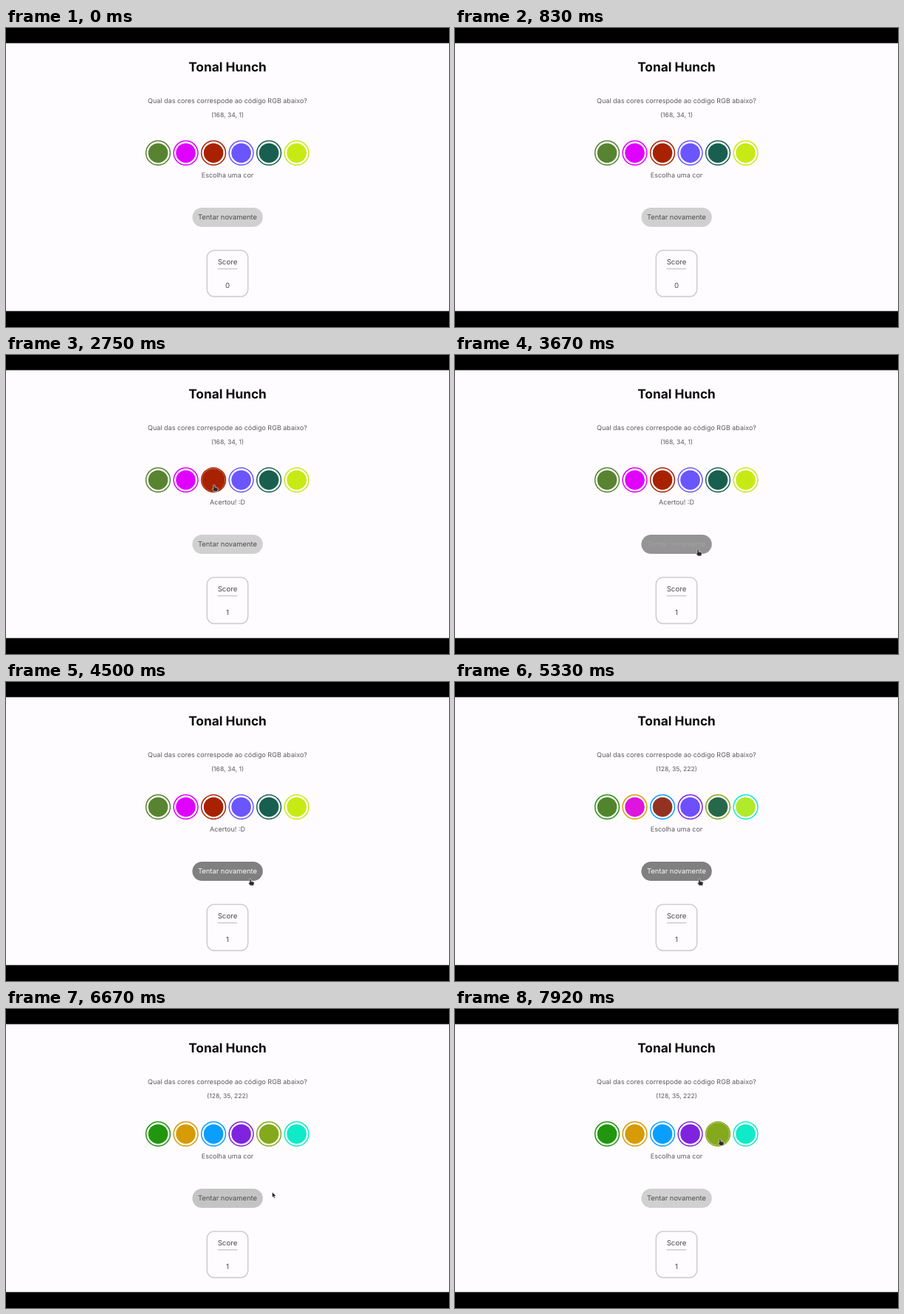
An HTML page that plays this animation: 600x406 px, repeating every 8 s.

```html
<!DOCTYPE html>
<html lang="pt">
<head>
<meta charset="utf-8">
<title>Tonal Hunch</title>
<style>
  html, body { margin: 0; width: 100%; height: 100%; overflow: hidden; background: #000; }
  svg { display: block; width: 100%; height: 100%; }
  text {
    font: 9px Inter, "Open Sans", sans-serif;
    fill: #5c5a5c;
    text-anchor: middle;
    text-rendering: geometricPrecision;
  }
  #title { font-size: 17.3px; font-weight: 700; fill: #0b0b0b; }
  #code { font-size: 8.6px; }
  #label { font-size: 9.4px; }
  .score { font-size: 9.7px; fill: #4c4a4c; }
  .line { fill: none; stroke: #d0ced0; stroke-width: 1.6; }
</style>
</head>
<body>
<svg viewBox="0 0 600 406">
  <rect width="600" height="406" fill="#000"/>
  <rect y="20.6" width="600" height="363.8" fill="#fefcfe"/>
  <text id="title" x="300" y="59.2">Tonal Hunch</text>
  <text x="300" y="102.3">Qual das cores correspode ao código RGB abaixo?</text>
  <text id="code" x="300" y="121.2"></text>
  <g id="swatches" stroke-width="1.5"></g>
  <text id="answer" x="300" y="202.6"></text>
  <rect id="button" x="252.4" y="244" width="95.4" height="26" rx="13"/>
  <text id="label" x="300" y="259.9">Tentar novamente</text>
  <rect class="line" x="272.3" y="302" width="55.4" height="62.6" rx="9.5"/>
  <text class="score" x="300" y="321.3">Score</text>
  <path class="line" d="M286.7 327h26.6" stroke-width="1.3"/>
  <text id="score" class="score" x="300" y="353.2"></text>
  <g id="cursor">
    <path id="arrow" d="M0 0V7.4L1.7 6 2.9 8.6 4.1 8 3 5.5H5.3Z" fill="#222" stroke="#fff" stroke-width=".5"/>
    <path id="beam" d="M-1.5-4.3Q0-4.3 0-3V3Q0 4.3-1.5 4.3M1.5-4.3Q0-4.3 0-3M0 3Q0 4.3 1.5 4.3" fill="none" stroke="#777" stroke-width=".8"/>
    <path id="hand" d="M-1.2 .8Q0-.8 1 .8V3.6L4.2 4.2Q5.4 4.5 5.2 6L4.5 9.4H-.2L-2.6 6.2Q-2.4 4.8-1.2 5.5Z" fill="#2c2c2c" stroke="#fff" stroke-width=".6"/>
  </g>
</svg>
<script>
const LOOP = 8000, FPS = 12;
const HIT = 2325, RESET = 5325;
const ROW_Y = 169.7;

const before = ["#588330", "#e000ff", "#a82201", "#6a55ff", "#185f50", "#c8ea14"];
const after = ["#21960f", "#d69b05", "#0a9fff", "#8023de", "#84a91c", "#0febc8"];

// Pointer stops: time, x, y
const stops = [
  [1250, 280, 199], [1500, 279.5, 188.7], [1830, 279.5, 188.7], [2170, 282, 176],
  [3170, 282, 176], [3920, 331, 267], [6330, 331, 267], [6670, 360.5, 248.5],
  [7170, 360, 183], [7500, 318, 178], [7670, 334, 197], [7920, 359, 176]
];

const $ = id => document.getElementById(id);
const ramp = (t, start, length) => Math.min(1, Math.max(0, (t - start) / length));
const easeOut = p => 1 - (1 - p) ** 3;
const mix = (a, b, p) => a + (b - a) * p;
const channels = hex => [1, 3, 5].map(i => parseInt(hex.slice(i, i + 2), 16));
const gray = v => `rgb(${v},${v},${v})`;
const centerX = i => 206 + 37.53 * i;

function blend(a, b, p) {
  const to = channels(b);
  return `rgb(${channels(a).map((v, i) => Math.round(mix(v, to[i], p)))})`;
}

function circle(i, r) {
  const el = document.createElementNS("http://www.w3.org/2000/svg", "circle");
  el.setAttribute("cx", centerX(i));
  el.setAttribute("cy", ROW_Y);
  el.setAttribute("r", r);
  el.setAttribute("fill", "none");
  return $("swatches").appendChild(el);
}

const swatches = before.map((_, i) => ({ ring: circle(i, 16.4), disc: circle(i, 13.3) }));

function pointerAt(t) {
  const next = stops.findIndex(s => s[0] > t);
  if (next === 0) return null;
  if (next < 0) return stops[stops.length - 1].slice(1);
  const [start, x0, y0] = stops[next - 1], [end, x1, y1] = stops[next];
  const p = easeOut(ramp(t, start, end - start));
  return [mix(x0, x1, p), mix(y0, y1, p)];
}

const onSwatch = i => (x, y) => Math.hypot(x - centerX(i), y - ROW_Y) < 17;
const onButton = (x, y) => Math.abs(x - 300) < 47.7 && y > 244 && y < 270;
const onAnswer = (x, y) => Math.abs(x - 300) < 36 && y > 187 && y < 207;

// Share of the last moments spent over an area: a linear hover transition
function hover(t, inside, length) {
  const samples = 20;
  let hits = 0;
  for (let k = 0; k < samples; k++) {
    const pos = pointerAt(t - length * k / samples);
    if (pos && inside(...pos)) hits++;
  }
  return hits / samples;
}

function drawPointer(t) {
  const pos = pointerAt(t);
  $("cursor").style.display = pos ? "" : "none";
  if (!pos) return;
  $("cursor").setAttribute("transform", `translate(${pos})`);
  const clickable = onButton(...pos) || before.some((_, i) => onSwatch(i)(...pos));
  const shape = clickable ? "hand" : onAnswer(...pos) ? "beam" : "arrow";
  for (const id of ["arrow", "beam", "hand"]) $(id).style.display = id === shape ? "" : "none";
}

function draw(t) {
  const won = t >= HIT, fresh = t >= RESET;
  const fade = fresh ? ramp(t, RESET - 40, 380) : 0;

  $("code").textContent = fresh ? "(128, 35, 222)" : "(168, 34, 1)";
  $("answer").textContent = won && !fresh ? "Acertou! :D" : "Escolha uma cor";
  $("score").textContent = won ? 1 : 0;

  swatches.forEach(({ ring, disc }, i) => {
    disc.setAttribute("r", 13.3 + 2.2 * hover(t, onSwatch(i), 200));
    disc.setAttribute("fill", blend(before[i], after[i], fade));
    ring.setAttribute("stroke", (fresh ? after : before)[i]);
  });

  const hot = hover(t, onButton, 300);
  $("button").setAttribute("fill", gray(mix(208, 128, hot)));
  $("label").style.fill = gray(mix(76, 250, hot ** 2.5));
  drawPointer(t);
}

function tick(now) {
  const step = Math.floor((now % LOOP + 4) * FPS / 1000) % (LOOP * FPS / 1000);
  draw(step * 1000 / FPS);
  requestAnimationFrame(tick);
}

draw(0);
requestAnimationFrame(tick);
</script>
</body>
</html>
```
